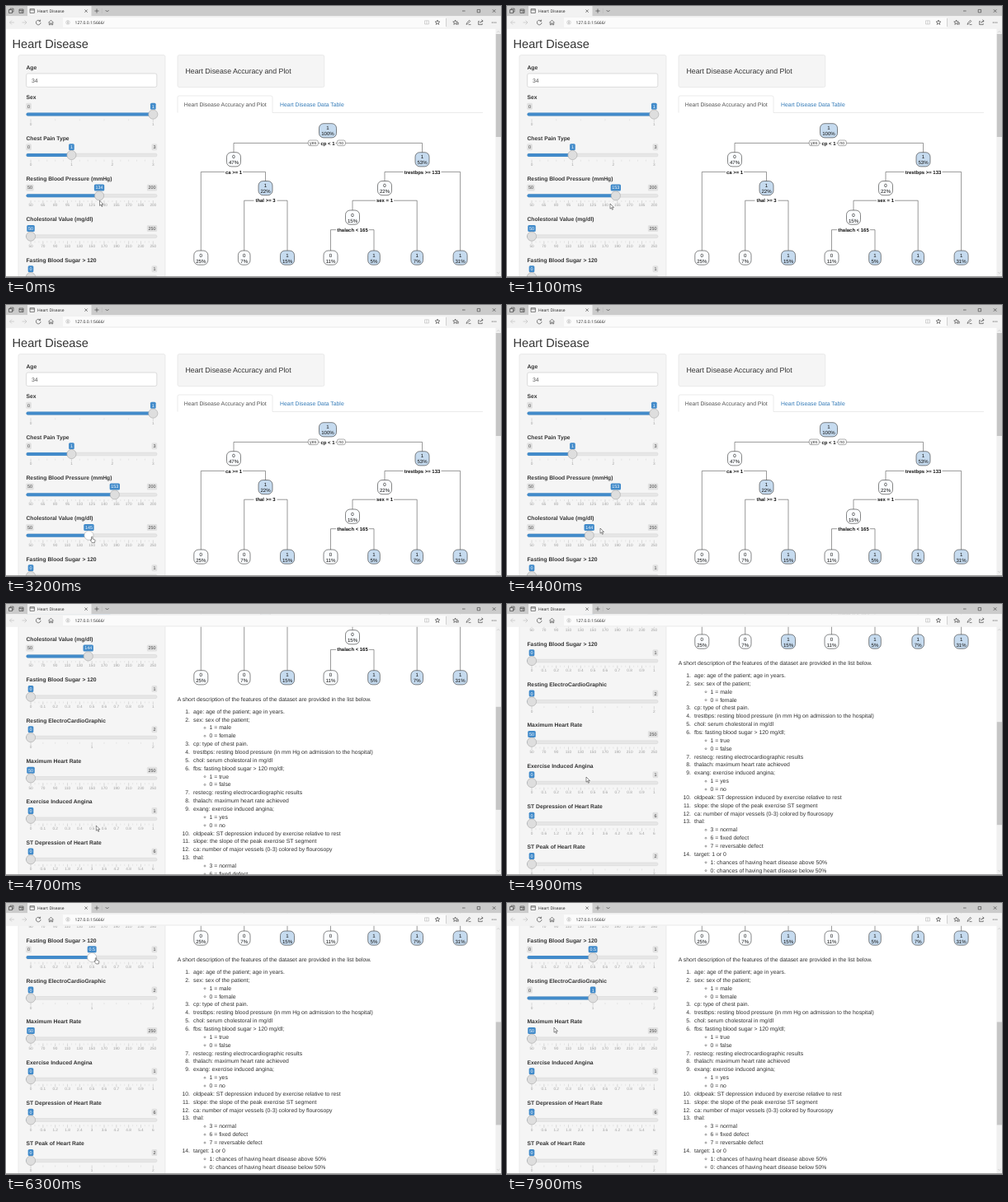
An HTML page for the animation above (8 s loop, 600 by 329 pixels).

```html
<!DOCTYPE html>
<html lang="en">
<head>
<meta charset="utf-8">
<title>Heart Disease</title>
<style>
html, body { margin: 0; width: 100%; height: 100%; overflow: hidden; background: #fff; }
svg { display: block; width: 600px; height: 329px; text-rendering: geometricPrecision; }
text { font: 6.84px "Liberation Sans", Arial, sans-serif; fill: #333; white-space: pre; }
text.b { font-weight: bold; font-size: 6.75px; }
text.mid { text-anchor: middle; }
text.end { text-anchor: end; }
text.h2 { font-size: 14.55px; }
text.h4 { font-size: 8.78px; }
text.badge { font-size: 5.4px; }
text.tick { font-size: 4.7px; fill: #a0a0a0; }
text.node { font-size: 6.1px; fill: #111; }
text.rule { font-size: 5.95px; fill: #111; }
text.ui { font: 5px "Open Sans", "Noto Sans", sans-serif; fill: #222; }
.well { fill: #f5f5f5; stroke: #e0e0e0; stroke-width: .6; }
.wire { fill: none; stroke: #555; stroke-width: .6; }
.icon { fill: none; stroke: #333; stroke-width: .6; }
.pale { stroke: #bbb; }
#cursor { fill: #fff; stroke: #222; stroke-width: .5; }
</style>
</head>
<body>
<svg viewBox="0 0 600 329">
  <rect width="600" height="329" fill="#fff"/>
  <g id="page"></g>
  <g id="bar"></g>
  <g id="chrome"></g>
  <path id="cursor"/>
</svg>
<script>
const $ = id => document.getElementById(id);
const text = (x, y, s, cls = '', extra = '') =>
  `<text x="${x}" y="${y}" class="${cls}" ${extra}>${s.replace(/</g, '&lt;')}</text>`;
const box = (x, y, w, h, r, attrs) =>
  `<rect x="${x}" y="${y}" width="${w}" height="${h}" rx="${r}" ${attrs}/>`;
const path = (d, cls) => `<path d="${d}" class="${cls}"/>`;

// ---------- sliders ----------
const X0 = 30, SPAN = 148.3;
const fmt = v => String(+v.toFixed(2));
// label, min, max, number of grid steps, value
const sliders = [
  ['Sex', 0, 1, 1, 1],
  ['Chest Pain Type', 0, 3, 3, 1],
  ['Resting Blood Pressure (mmHg)', 50, 200, 10, 134],
  ['Cholestoral Value (mg/dl)', 50, 250, 10, 50],
  ['Fasting Blood Sugar > 120', 0, 1, 10, 0],
  ['Resting ElectroCardioGraphic', 0, 2, 2, 0],
  ['Maximum Heart Rate', 50, 250, 10, 50],
  ['Exercise Induced Angina', 0, 1, 10, 0],
  ['ST Depression of Heart Rate', 0, 6, 10, 0],
  ['ST Peak of Heart Rate', 0, 2, 2, 0]
];
const sliderY = k => 110.8 + 49.36 * k;
const badgeWidth = s => 3.8 + [...s].reduce((w, c) => w + (c === '.' ? 1.4 : 2.85), 0);

function badge(cx, y, s, fill, ink) {
  const w = badgeWidth(s);
  return box(cx - w / 2, y + 7, w, 8, 1.5, `fill="${fill}"`) +
    text(cx, y + 12.9, s, 'badge mid', `style="fill:${ink}"`);
}

function sliderFrame([label, min, max, n], k) {
  const y = sliderY(k), sub = n > 7 ? 3 : 5;
  let big = '', small = '', out = text(24.5, y + 2.4, label, 'b');
  for (let i = 0; i <= n * sub; i++) {
    const x = X0 + SPAN * i / (n * sub);
    if (i % sub) small += `M${x} ${y + 26.5}v2`;
    else {
      big += `M${x} ${y + 26.5}v3.6`;
      out += text(x, y + 33.9, fmt(min + (max - min) * i / (n * sub)), 'tick mid');
    }
  }
  return out + `<path d="${big}" stroke="#bbb" stroke-width=".5"/>` +
    `<path d="${small}" stroke="#d4d4d4" stroke-width=".5"/>` +
    box(24.5, y + 18.9, 158.5, 3.8, 1.9, 'fill="#e6e6e6" stroke="#ccc" stroke-width=".4"') +
    `<g id="s${k}"></g>`;
}

function sliderValue(k, v, cursor) {
  const [, min, max] = sliders[k], y = sliderY(k);
  const x = X0 + SPAN * (v - min) / (max - min);
  const s = fmt(v), half = badgeWidth(s) / 2;
  const wMin = badgeWidth(fmt(min)), wMax = badgeWidth(fmt(max));
  const hover = !!cursor && Math.hypot(cursor[0] - x, cursor[1] - y - 20.8) < 5.6;
  let out = box(24.5, y + 18.8, x - 24.5, 4, 2, 'fill="#428bca"');
  if (x - half > 24.2 + wMin) out += badge(24.2 + wMin / 2, y, fmt(min), '#e1e1e1', '#444');
  if (x + half < 183.2 - wMax) out += badge(183.2 - wMax / 2, y, fmt(max), '#e1e1e1', '#444');
  out += badge(x, y, s, '#428bca', '#fff') +
    `<circle cx="${x}" cy="${y + 20.8}" r="5.6" fill="${hover ? '#fff' : '#dedede'}" stroke="#a6a6a6" stroke-width=".6"/>`;
  $('s' + k).innerHTML = out;
  return hover;
}

// ---------- decision tree ----------
// x, y, class, share
const nodes = [
  [390, 151, 1, 100], [276, 186, 0, 47], [504.5, 186, 1, 53], [314.5, 220.8, 1, 22],
  [459, 220.8, 0, 22], [420, 256.3, 0, 15], [236.3, 305.3, 0, 25], [288.7, 305.3, 0, 7],
  [341, 305.3, 1, 15], [393.5, 305.3, 0, 11], [446, 305.3, 1, 5], [498.2, 305.3, 1, 7],
  [550.6, 305.3, 1, 31]
];
// parent, left child, right child, rule
const splits = [
  [0, 1, 2, 'cp < 1'], [1, 6, 3, 'ca >= 1'], [2, 4, 12, 'trestbps >= 133'],
  [3, 7, 8, 'thal >= 3'], [4, 5, 11, 'sex = 1'], [5, 9, 10, 'thalach < 165']
];

function tree() {
  let out = '';
  for (const [p, l, r, rule] of splits) {
    const [px, py] = nodes[p], [lx, ly] = nodes[l], [rx, ry] = nodes[r];
    const y = py + 15.4, w = rule.length * 3 + 1;
    out += path(`M${lx} ${ly}V${y}H${rx}V${ry}`, 'wire') +
      box(px - w / 2, y - 3.5, w, 7, 0, 'fill="#fff"') + text(px, y + 2.1, rule, 'b rule mid');
  }
  for (const [x, w, s] of [[372.3, 12, 'yes'], [406.3, 10, 'no']])
    out += box(x - w / 2, 163, w, 6.6, 2, 'fill="#fff" stroke="#555" stroke-width=".5"') +
      text(x, 167.9, s, 'badge mid');
  for (const [x, y, cls, pct] of nodes) {
    const w = pct === 100 ? 21 : pct > 9 ? 17 : 14.6;
    out += box(x - w / 2, y - 8.3, w, 17.2, 5.5,
      `fill="${cls ? '#c6dbef' : '#fbfdff'}" stroke="#333" stroke-width=".6"`) +
      text(x, y - .8, String(cls), 'node mid') + text(x, y + 6.3, pct + '%', 'node mid');
  }
  return out;
}

// ---------- feature list ----------
const features = `age: age of the patient; age in years.
sex: sex of the patient;
-1 = male
-0 = female
cp: type of chest pain.
trestbps: resting blood pressure (in mm Hg on admission to the hospital)
chol: serum cholestoral in mg/dl
fbs: fasting blood sugar > 120 mg/dl;
-1 = true
-0 = false
restecg: resting electrocardiographic results
thalach: maximum heart rate achieved
exang: exercise induced angina;
-1 = yes
-0 = no
oldpeak: ST depression induced by exercise relative to rest
slope: the slope of the peak exercise ST segment
ca: number of major vessels (0-3) colored by flourosopy
thal:
-3 = normal
-6 = fixed defect
-7 = reversable defect
target: 1 or 0
-1: chances of having heart disease above 50%
-0: chances of having heart disease below 50%`.split('\n');

function list() {
  let n = 0;
  return features.map((s, i) => {
    const y = 349 + 9.86 * i;
    return s[0] === '-'
      ? `<circle cx="241" cy="${y - 2}" r="1" fill="none" stroke="#444" stroke-width=".5"/>` +
        text(246.6, y, s.slice(1))
      : text(223, y, ++n + '.', 'end') + text(227, y, s);
  }).join('');
}

$('page').innerHTML =
  text(7.6, 51.3, 'Heart Disease', 'h2') +
  box(15, 59.6, 178, 640, 2, 'class="well"') +
  text(24.5, 76.6, 'Age', 'b') +
  box(24.6, 82, 158.2, 16.4, 2, 'fill="#fff" stroke="#c8c8c8" stroke-width=".6"') +
  text(31, 92.6, '34', '', 'style="fill:#555"') +
  sliders.map(sliderFrame).join('') +
  box(208, 59.6, 177.8, 39, 2, 'class="well"') +
  text(217.5, 82.2, 'Heart Disease Accuracy and Plot', 'h4') +
  '<path d="M208 129.5V111Q208 109 210 109H321Q323 109 323 111V129.5H578" fill="none" stroke="#ddd" stroke-width=".6"/>' +
  text(215.8, 121.6, 'Heart Disease Accuracy and Plot', '', 'style="fill:#555"') +
  text(332, 121.6, 'Heart Disease Data Table', '', 'style="fill:#337ab7"') +
  tree() +
  text(207.8, 334.4, 'A short description of the features of the dataset are provided in the list below.') +
  list();
sliders.forEach((s, k) => sliderValue(k, s[4]));

// ---------- browser window ----------
$('bar').innerHTML =
  box(593.4, 27, 6.6, 302, 0, 'fill="#f0f0f0"') +
  path('M595 32.2l1.7-1.7l1.7 1.7M595 323l1.7 1.7l1.7-1.7', 'icon pale') +
  '<rect id="thumb" x="593.8" y="34" width="6.2" height="125" fill="#c6c6c6"/>' +
  box(0, 328.2, 600, .8, 0, 'fill="#888"');

const star = (x, y) => {
  let d = '';
  for (let i = 0; i < 10; i++) {
    const a = Math.PI * (i / 5 - .5), r = i % 2 ? 1.3 : 3;
    d += `${i ? 'L' : 'M'}${x + r * Math.cos(a)} ${y + r * Math.sin(a)}`;
  }
  return path(d + 'Z', 'icon');
};
$('chrome').innerHTML =
  box(0, 0, 600, 12.5, 0, 'fill="#cbcbcb"') +
  box(0, 12.2, 600, 15.6, 0, 'fill="#f2f2f2"') +
  box(26, 0, 77.5, 12.6, 0, 'fill="#f2f2f2"') +
  box(69, 14, 464, 12, 0, 'fill="#fbfbfb"') +
  path('M3.5 4.5h4v4h-4zM5 4.5v-1.4h4v4h-1.5M16 4h5v4.5h-5zM16 5.4h5M18 7h3', 'icon') +
  path('M29 3.6h5.4v4.8h-5.4zM29 5h5.4M95.4 4.4l3.4 3.4M98.8 4.4l-3.4 3.4', 'icon') +
  path('M107.4 6h5.2M110 3.4v5.2M120.6 5l2 2l2-2', 'icon') +
  path('M116.3 3v6', 'icon pale') +
  path('M553 6h3.6M571.2 4.4h3.4v3.4h-3.4zM589.8 4.2l3.6 3.6M593.4 4.2l-3.6 3.6', 'icon') +
  path('M10 20H4.5M7 17.5L4.5 20L7 22.5M19.5 20H25M22.5 17.5L25 20L22.5 22.5', 'icon pale') +
  path('M41.3 18.2A2.8 2.8 0 1 0 42 20M41.6 16.6v1.9h-1.9', 'icon') +
  path('M51.5 20.2l3-3l3 3M52.3 19.6v3.2h1.5v-2h1.4v2h1.5v-3.2', 'icon') +
  '<circle cx="75" cy="20" r="2.3" class="icon pale"/>' +
  path('M75 19.6v1.6M75 18.4v.5', 'icon') +
  path('M507.5 17.8h5v4.2h-5zM510 17.8v4.2', 'icon pale') +
  path('M533.5 15v10', 'icon pale') +
  star(523, 20) + star(544.6, 20) + path('M547 20.6h2M546.6 22h2.4', 'icon') +
  path('M558 22.5l.6-2l3-3.2l1.2 1.2l-3.2 3zM560.5 22.6h3', 'icon') +
  path('M574 18.6h-1.4v4h4.6v-1.4M574.4 21q.4-2.8 3.6-2.8M576.4 16.6l1.8 1.6l-1.8 1.6', 'icon') +
  [589.4, 591.6, 593.8].map(x => `<circle cx="${x}" cy="20" r=".6" fill="#333"/>`).join('') +
  text(38, 7.9, 'Heart Disease', 'ui') + text(83.6, 21.8, '127.0.0.1:5666/', 'ui');

// ---------- motion ----------
// keys: [ms, value] pairs, linear between
function track(t, keys) {
  let i = 0;
  while (i < keys.length - 2 && t > keys[i + 1][0]) i++;
  const [a, ...u] = keys[i], [b, ...v] = keys[i + 1];
  const p = Math.min(1, Math.max(0, (t - a) / (b - a)));
  return u.map((n, j) => n + (v[j] - n) * p);
}
const scrollKeys = [[4500, 0], [4600, 110], [4700, 216.3], [4800, 246], [4900, 260], [5000, 263], [8000, 263]];
const pressureKeys = [[0, 134], [900, 153]];
const cholKeys = [[1800, 50], [1900, 66], [2100, 123], [2300, 138], [2500, 145], [3800, 145], [3900, 144]];
const sugarKeys = [[5600, 0], [6200, .5]];
const ecgKeys = [[7000, 0], [7400, 1]];
const cursorKeys = [
  [0, 113.5, 236.2], [900, 132, 235], [1100, 125, 240], [1600, 33, 279], [1800, 31, 280],
  [2100, 98.5, 283], [2500, 104, 281], [3100, 104, 281], [3600, 105, 282], [4100, 103, 281],
  [4400, 113, 271], [4600, 112, 270.5], [4700, 109.3, 269], [4900, 96, 210], [5400, 31, 66],
  [5600, 31, 66], [6200, 109, 66.5], [6500, 109, 66.5], [7000, 31, 115], [7400, 104, 115],
  [7500, 102, 117], [7800, 59, 149], [7900, 57, 151]
];
const ARROW = 'M0 0V6.2L1.5 4.9L2.5 7.3L3.5 6.9L2.5 4.5H4.5Z';
const HAND = 'M-.7 .4Q0 -.5 .7 .4V2.8L3 3.4Q4 3.8 3.8 4.8L3.2 7.4H.3L-1.9 4.7Q-2 3.7 -1 4L-.7 4.3Z';

function draw(t) {
  const [scroll] = track(t, scrollKeys);
  const [x, y] = track(t, cursorKeys);
  const at = [x, y + scroll];
  $('page').setAttribute('transform', `translate(0 ${-scroll})`);
  $('thumb').setAttribute('y', 34 + .42 * scroll);
  const hovers = [
    sliderValue(2, Math.round(track(t, pressureKeys)[0]), at),
    sliderValue(3, Math.round(track(t, cholKeys)[0]), at),
    sliderValue(4, Math.round(track(t, sugarKeys)[0] * 10) / 10, at),
    sliderValue(5, Math.round(track(t, ecgKeys)[0]), at)
  ];
  $('cursor').setAttribute('d', hovers.includes(true) ? HAND : ARROW);
  $('cursor').setAttribute('transform', `translate(${x} ${y})`);
}

let last = -1;
const start = performance.now();
function tick() {
  const t = Math.floor((performance.now() - start) % 8000 / 100) * 100;
  if (t !== last) draw(last = t);
  requestAnimationFrame(tick);
}
draw(0);
tick();
</script>
</body>
</html>
```
